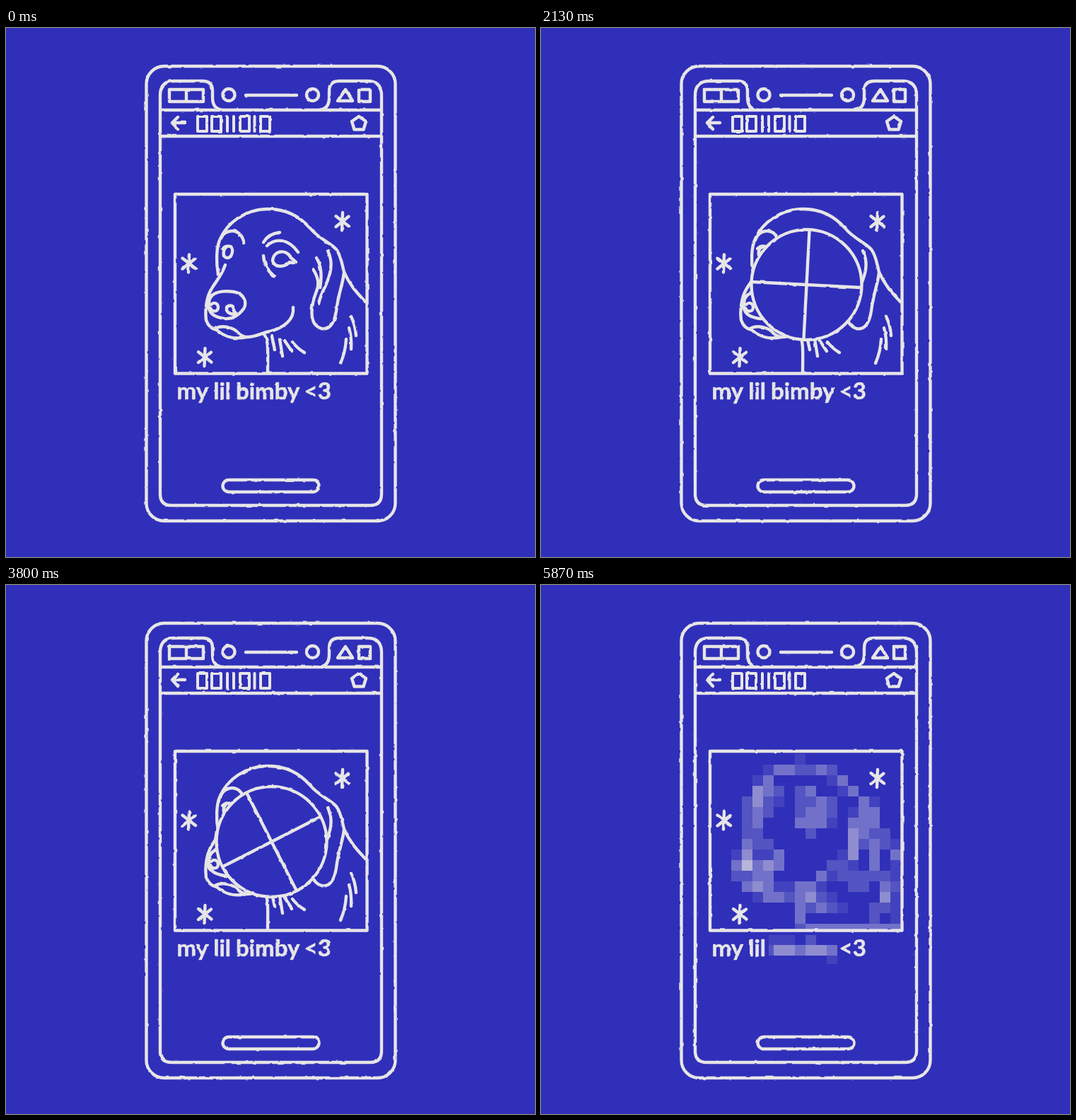
These frames come from a looping animation (748 px wide and 748 px high, 6.07 s). An HTML page:

```html
<!DOCTYPE html>
<html lang="en">
<head>
<meta charset="utf-8">
<title>Photo message</title>
<style>
  html, body { margin: 0; width: 100%; height: 100%; overflow: hidden; background: #302fb9; }
  svg { display: block; width: 100%; height: 100%; }
  .ink { fill: none; stroke: #e6e5e6; stroke-width: 4.4; stroke-linecap: round; stroke-linejoin: round; }
  text { font: 700 33px Lato, sans-serif; fill: #e6e5e6; stroke-width: 0.6; }
</style>
</head>
<body>
<svg viewBox="0 0 748 748">
  <defs>
    <filter id="rough" filterUnits="userSpaceOnUse" x="0" y="0" width="748" height="748" color-interpolation-filters="sRGB">
      <feTurbulence id="noise" type="fractalNoise" baseFrequency="0.11" numOctaves="1" seed="1"/>
      <feDisplacementMap in="SourceGraphic" scale="2.6" xChannelSelector="R" yChannelSelector="G"/>
    </filter>
    <clipPath id="windows">
      <rect x="241" y="237" width="267.5" height="249.5"/>
      <rect x="322" y="495" width="98" height="41"/>
    </clipPath>
    <path id="star" d="M.5 -12.5L-.5 12.5M-9 -7.5L9.5 7M9 -7L-9 7.5"/>
  </defs>

  <rect width="748" height="748" fill="#302fb9"/>
  <g id="mosaic" clip-path="url(#windows)" fill="#e6e5e6" shape-rendering="crispEdges"></g>

  <g class="ink" filter="url(#rough)">
    <g id="clear">
      <path id="dog"/>
      <text x="325" y="524.5">bimby</text>
    </g>
    <g id="spinner" transform="translate(375.5 363)">
      <circle r="78" fill="#302fb9"/>
      <path id="cross" d="M-77 0H77M0 -77V77"/>
    </g>

    <rect x="198.5" y="54" width="352" height="643" rx="25"/>
    <path d="M218 116V95Q218 75 238 75H278Q292 75 292 89V98Q292 116 308 116M441 116Q457 116 457 98V89Q457 75 471 75H511Q531 75 531 95V659Q531 675 515 675H234Q218 675 218 659V116H531M218 153H531"/>
    <path d="M231 87H279V104H231ZM255 87V104M339 95H411M480 87L490 103H469ZM499 87H515V104H499Z"/>
    <circle cx="315" cy="94.5" r="8.5"/>
    <circle cx="433.5" cy="94.5" r="8.5"/>
    <path d="M253 134H235M243 126L235 134L243 143M499 125L509 132L505.5 143.5H492.5L489 132Z"/>
    <path stroke-width="4" d="M271 125h13v21h-13zM291 125h13v21h-13zM313 125v21M322 125v21M331 125h13v21h-13zM351.5 125v21M360 125h13v21h-13z"/>
    <rect x="239" y="235" width="271.5" height="253.5"/>
    <rect x="306.5" y="639" width="136" height="17" rx="8.5"/>
    <use href="#star" x="258.5" y="333"/>
    <use href="#star" x="475.5" y="273.5"/>
    <use href="#star" x="281" y="465.5"/>
    <text x="241.5" y="524.5">my lil</text>
    <text x="421.5" y="524.5">&lt;3</text>
  </g>
</svg>

<script>
const el = id => document.getElementById(id);
const SIZE = 748, CELL = SIZE / 50;
const LOOP = 6070, TICK = 1000 / 15;

const dogLines = [
  // skull and back
  'M300 348C297 332 297 310 303 298C313 275 338 257 368 256C394 255 414 265 430 283C441 297 459 304 467 313C474 322 475 334 478 345C486 364 498 376 508 387',
  // ear
  'M478 345C477 360 470 375 467 400C464 420 456 427 446 425C433 421 430 408 434 388C437 374 443 368 441 357Q439 348 434 341',
  'M455 315C464 333 458 350 452 364Q444 380 442 390M439 325C446 336 447 350 444 367',
  // muzzle and jaw
  'M310 335C304 352 296 359 290 370C284 380 281 398 283 413Q287 425 298 427C310 438 326 440 340 437C355 437 361 431 373 429C392 424 408 413 406 395',
  'M296 425C306 419 323 424 328 431Q333 436 340 437',
  // nose
  'M287 388C288 372 308 371 322 373C338 376 341 389 336 397C330 405 321 412 309 411C296 409 284 404 287 388',
  'M290 391C294 387 300 389 300 395C300 402 291 402 289 396M326 404C318 406 311 402 312 396C314 391 322 391 322 398Q322 402 326 404',
  // eyes
  'M303 300C307 287 321 284 329 290Q336 296 336 304M306 312Q311 307 318 309C322 313 320 325 313 325C306 325 306 314 312 309',
  'M364 303Q371 291 387 289M369 308C380 297 399 297 413 317M364 322Q365 339 379 351',
  'M377 329C378 314 397 312 403 325L410 331Q405 333 401 331C394 339 379 339 377 329',
  // chest and fur
  'M364 432C372 440 370 460 370 488M376 436L380 455M387 440L391 464M394 442L404 457M405 444Q412 453 422 459',
  'M488 408Q494 420 495 435M485 424Q489 438 488 454M481 440Q480 458 473 474'
].join('');
const frameEdge = 'M370 488H510V387';

function buildMosaic() {
  const canvas = document.createElement('canvas');
  canvas.width = canvas.height = SIZE;
  const ctx = canvas.getContext('2d');
  ctx.lineWidth = 4.4;
  ctx.lineCap = ctx.lineJoin = 'round';
  ctx.stroke(new Path2D(dogLines + frameEdge));
  ctx.font = '700 33px Lato, sans-serif';
  ctx.fillText('bimby', 325, 524.5);
  const { data } = ctx.getImageData(0, 0, SIZE, SIZE);

  const sums = new Float32Array(2500);
  for (let y = 0; y < SIZE; y++) {
    for (let x = 0; x < SIZE; x++) {
      const cell = Math.floor(y / CELL) * 50 + Math.floor(x / CELL);
      sums[cell] += data[(y * SIZE + x) * 4 + 3] / 255;
    }
  }

  const shades = [0, 0.1, 0.2, 0.36, 0.52, 0.74];
  const nearest = v => shades.reduce((a, b) => Math.abs(b - v) < Math.abs(a - v) ? b : a);
  let tiles = '';
  sums.forEach((sum, i) => {
    const shade = nearest(sum / CELL ** 2);
    if (!shade) return;
    const x = i % 50 * CELL, y = Math.floor(i / 50) * CELL;
    tiles += `<rect x="${x}" y="${y}" width="${CELL}" height="${CELL}" fill-opacity="${shade}"/>`;
  });
  el('mosaic').innerHTML = tiles;
}

const show = (id, on) => { el(id).style.display = on ? '' : 'none'; };

let lastTick = -1;
function draw(time) {
  const tick = Math.floor(time / TICK + 0.06);
  if (tick === lastTick) return;
  lastTick = tick;
  const hidden = tick >= 60;
  show('clear', !hidden);
  show('mosaic', hidden);
  show('spinner', tick >= 30 && !hidden);
  // one turn per second, drawn at 15 poses
  el('cross').setAttribute('transform', `rotate(${45 + (tick - 30) * 24})`);
  // the hand-drawn edge wobbles every fourth tick
  el('noise').setAttribute('seed', 1 + Math.floor(tick / 4));
}

el('dog').setAttribute('d', dogLines);
buildMosaic();
const start = performance.now();
function loop() {
  draw((performance.now() - start) % LOOP);
  requestAnimationFrame(loop);
}
loop();
</script>
</body>
</html>
```
